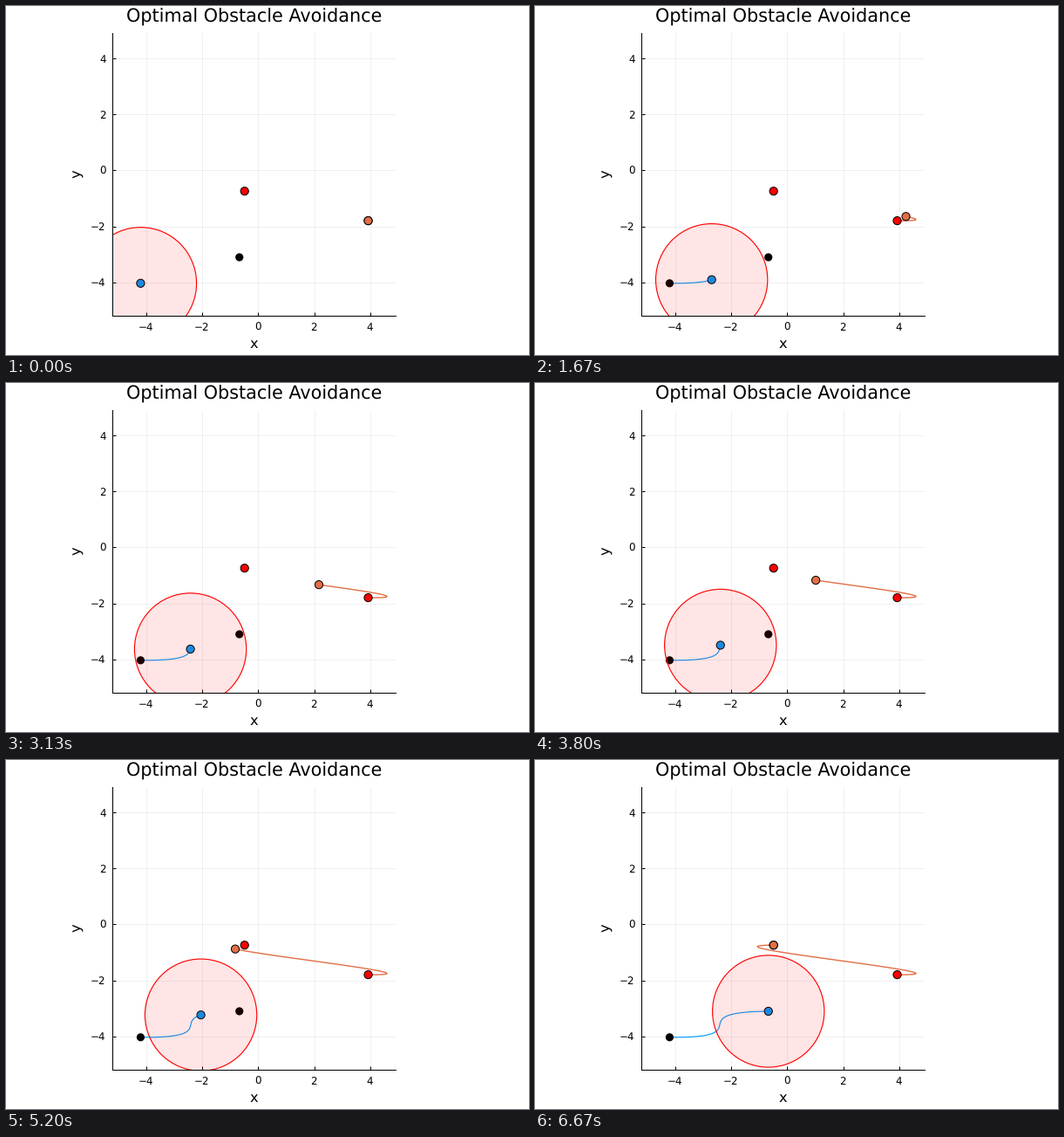
Animation, 600 px wide and 400 px high, one loop 6.74 s. Source, as a matplotlib script:

```python
import numpy as np
import matplotlib.pyplot as plt
from matplotlib.animation import FuncAnimation
from matplotlib.patches import Circle

W, H, DPI = 600, 400, 100
LOOP_MS, TICK_MS = 6740, 20
STEPS, RATE = 101, 15              # poses in the loop, poses per second
PX = 72 / DPI                      # one pixel in points
UNIT = 32.07                       # pixels per data unit
ORIGIN = 289.42, 188.43            # pixel position of (0, 0)
LEFT, RIGHT, TOP, BOTTOM = 122.3, 447.5, 30.5, 355.3
TICKS = range(-4, 5, 2)
SAFE_RADIUS = 2
BLUE, ORANGE = "#009afa", "#e26f46"

plt.rcParams["font.family"] = "DejaVu Sans"
plt.rcParams["text.hinting"] = "none"


def trajectory(start, end, v0, v1):
    """Cubic with given end points and end velocities over unit time."""
    s = np.linspace(0, 1, STEPS)[:, None]
    p, q, v, w = map(np.array, (start, end, v0, v1))
    blend = s**2 * (3 - 2 * s)
    return p + (q - p) * blend + v * s * (1 - s)**2 - w * s**2 * (1 - s)


blue_path = trajectory((-4.209, -4.034), (-0.676, -3.104),
                       (10.056, -0.094), (9.853, 0.094))
orange_path = trajectory((3.932, -1.798), (-0.490, -0.741),
                         (10.296, -0.094), (9.486, 0.031))

fig = plt.figure(figsize=(W / DPI, H / DPI), dpi=DPI, facecolor="white")
ax = fig.add_axes([LEFT / W, 1 - BOTTOM / H,
                   (RIGHT - LEFT) / W, (BOTTOM - TOP) / H])
ax.set_xlim((LEFT - ORIGIN[0]) / UNIT, (RIGHT - ORIGIN[0]) / UNIT)
ax.set_ylim((ORIGIN[1] - BOTTOM) / UNIT, (ORIGIN[1] - TOP) / UNIT)
ax.set_xticks(TICKS)
ax.set_yticks(TICKS)
ax.tick_params(direction="in", length=4 * PX, width=PX,
               labelbottom=False, labelleft=False)
ax.grid(color="black", alpha=0.058, linewidth=PX)
ax.set_axisbelow(True)
for side, spine in ax.spines.items():
    spine.set_visible(side in ("left", "bottom"))
    spine.set_linewidth(PX)
    spine.set_zorder(8)


def label(x, y, text, size, ha="center", **kw):
    fig.text(x / W, 1 - y / H, text, fontsize=size * PX,
             ha=ha, va="baseline", **kw)


label(285, 19, "Optimal Obstacle Avoidance", 20.8)
label(284.4, 391.5, "x", 16.3)
label(86, 192.4, "y", 16.3, rotation=90, rotation_mode="anchor")
for t in TICKS:
    name = str(t).replace("-", "\u2212")
    label(ORIGIN[0] + t * UNIT - 0.4, 371.8, name, 11.9)
    label(114.6, ORIGIN[1] - t * UNIT + 4.5, name, 11.9, ha="right")


def dot(point, color, zorder):
    edge = 0 if color == "black" else PX
    return ax.add_patch(Circle(point, 4.6 / UNIT, facecolor=color,
                               edgecolor="black", linewidth=edge,
                               zorder=zorder))


agents = []
for path, color, end_color, width in ((blue_path, BLUE, "black", 1.15),
                                      (orange_path, ORANGE, "red", 1.4)):
    trail, = ax.plot([], [], color=color, linewidth=width * PX, zorder=3)
    dot(path[0], end_color, 4)
    dot(path[-1], end_color, 4)
    agents.append((path, trail, dot(path[0], color, 5)))

zone = Circle(blue_path[0], SAFE_RADIUS, facecolor=(1, 0, 0, 0.1),
              edgecolor="red", linewidth=1.15 * PX, zorder=6)
ax.add_patch(zone)


def update(i):
    # the pose due at the middle of this tick
    mid_ms = (i + 0.5) * TICK_MS
    k = min(int((mid_ms + 4) * RATE / 1000), STEPS - 1)
    for path, trail, marker in agents:
        trail.set_data(path[:k + 1, 0], path[:k + 1, 1])
        marker.center = path[k]
    zone.center = blue_path[k]
    return []


anim = FuncAnimation(fig, update, frames=LOOP_MS // TICK_MS, interval=TICK_MS,
                     init_func=lambda: update(0), repeat=True, repeat_delay=0)
plt.show()
```
